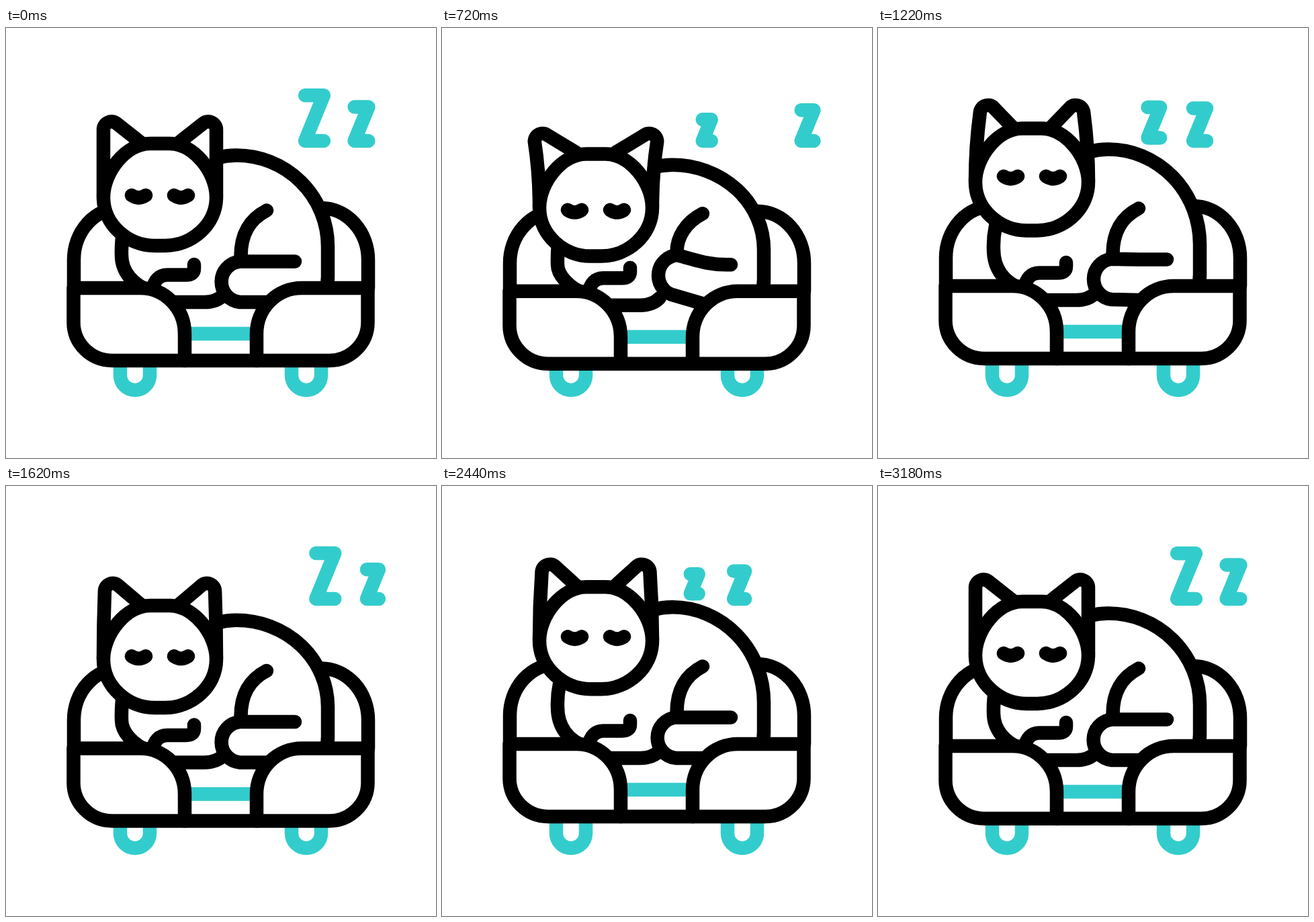
Recreate the animation shown at these times as an HTML page. Size 640 by 640 pixels, loop 3400 ms.

```html
<!DOCTYPE html>
<html lang="en">
<head>
<meta charset="utf-8">
<title>Sleeping cat</title>
<style>
html, body { margin: 0; height: 100%; overflow: hidden; background: #fff; }
svg { display: block; width: 100%; height: 100%; }
path { stroke-width: 20.5; stroke-linecap: round; stroke-linejoin: round; }
.ink { stroke: #000; fill: none; }
.solid { stroke: #000; fill: #fff; }
.teal { stroke: #3cc; fill: none; }
.flat { stroke-linecap: butt; }
</style>
</head>
<body>
<svg viewBox="0 0 640 640">
  <path class="teal" id="bigZ"/>
  <path class="teal" id="smallZ"/>
  <path class="teal flat" d="M170 490V517A22 22 0 0 0 214 517V490M425 490V517A22 22 0 0 0 469 517V490"/>
  <g id="bed">
    <path class="solid" d="M101 387V345A70 77 0 0 1 171 268H469A70 77 0 0 1 539 345V387"/>
    <path class="solid" id="back"/>
    <path class="ink" d="M218 390Q222 367.500 240 367.500H268Q280 367.500 280 358V352M250 408H295Q314 408 324 397"/>
    <path class="ink" id="leg"/>
    <path class="teal flat" d="M270 455H370"/>
    <path class="solid" d="M100.500 387H200A66 68 0 0 1 266 455V495H158A57.500 57 0 0 1 100.500 438Z"/>
    <path class="solid" d="M538.500 387H440A67 68 0 0 0 373 455V495H481A57.500 57 0 0 0 538.500 438Z"/>
    <path class="ink" d="M266 495H373"/>
  </g>
  <g id="head">
    <path class="solid" id="earL"/>
    <path class="solid" id="earR" transform="translate(458) scale(-1 1)"/>
    <path class="solid" d="M145 252C145 215 178 172 215 172H243C280 172 313 215 313 252C313 293 276 324 237 324H221C182 324 145 293 145 252Z"/>
    <path class="ink" id="eyes" d="M187 249Q197.500 256 208 249M250 249Q260.500 256 271 249"/>
  </g>
</svg>
<script>
const LOOP = 3400, REST = 200, STEP = 20;
const $ = id => document.getElementById(id);
const draw = (id, d) => $(id).setAttribute('d', d);
const shift = (id, y) => $(id).setAttribute('transform', `translate(0 ${y})`);
const linear = p => p;
const smooth = p => (1 - Math.cos(Math.PI * p)) / 2;

// Value at time t between a few [time, value] points.
function between(points, t, ease) {
  const i = points.findIndex(p => p[0] > t);
  if (i < 1) return points[i ? points.length - 1 : 0][1];
  const [t0, v0] = points[i - 1], [t1, v1] = points[i];
  return v0 + (v1 - v0) * ease((t - t0) / (t1 - t0));
}

// Two breaths: down, up, down, up, rest.
const breathe = (t, down, up) => between(
  [[0, 0], [340, down], [950, up], [1720, down], [2280, up], [2840, 0]], t, smooth);

// One slow twitch of the hind paw during the first breath.
function twitch(t) {
  const p = Math.min(1, Math.max(0, (t - 220) / 860));
  return 1.2 * Math.sin(Math.PI * p) ** 2;
}

// Laps travelled by the drifting letters.
const drift = t => between([[0, 0], [1400, 1.065], [1940, 1.36], [2700, 2]], t, linear);

const END = 584;
const BIG = { left: 369, rest: 459, size: 68, born: 26, grow: 0.465, lift: 0.2 };
const SMALL = { left: 361, rest: 529, size: 50.5, born: 25, grow: 0.2, lift: 0 };

function drawZ(id, z, laps) {
  const span = END - z.left;
  const x = z.left + (z.rest - z.left + span * laps) % span;
  const h = Math.min(z.size, z.born + z.grow * (x - z.left), 1.04 * (END + 4 - x));
  const foot = 168 - (x < z.rest ? z.lift * (z.size - h) : 0);
  const w = h * 0.205;
  draw(id, `M${x - w} ${foot - h}H${x + w}L${x - w} ${foot}H${x + w}`);
}

function render(t) {
  const bed = breathe(t, 6.7, -3.2);
  const head = breathe(t - 20, 23, -23);
  const droop = breathe(t - 150, 1.05, -1.05);
  const k = twitch(t);
  shift('bed', bed);
  shift('head', head);
  shift('eyes', 6 * droop);

  const top = 189.5 + 2 * bed, chest = 338 + 2 * bed;
  draw('back', `M215 392C188 382 172 362 172 ${chest}Q171 300 184 270L313 ${top + 4}Q328 ${top} 343 ${top}` +
    `A136 ${325 - top} 0 0 1 479 325V370Q479 380 476 388`);
  draw('leg', `M388 271.5C362 285 349.5 307 349.5 ${340 - 12 * k}` +
    `M430 347.5C${403 - 3 * k} ${347.5 + k} ${375 + 10 * k} ${347.5 - 5 * k} ${348 + 2 * k} ${347.5 - 15 * k}` +
    `A30.4 30.4 0 0 0 ${348 - 7 * k} ${408 - 17 * k}L390 ${408 - 2 * k}`);

  const dx = -7 * droop, dy = 2 * droop;
  const ear = `M145 250Q145 200 ${145 + dx} ${151 + dy}` +
    `A12 12 0 0 1 ${164.5 + dx} ${142 + dy}L200 170`;
  draw('earL', ear);
  draw('earR', ear);

  const laps = drift(t);
  drawZ('bigZ', BIG, laps);
  drawZ('smallZ', SMALL, laps);
}

const start = performance.now();
function tick() {
  const t = (performance.now() - start) % LOOP;
  render(Math.max(0, Math.floor(t / STEP) * STEP - REST));
  requestAnimationFrame(tick);
}
tick();
</script>
</body>
</html>
```
